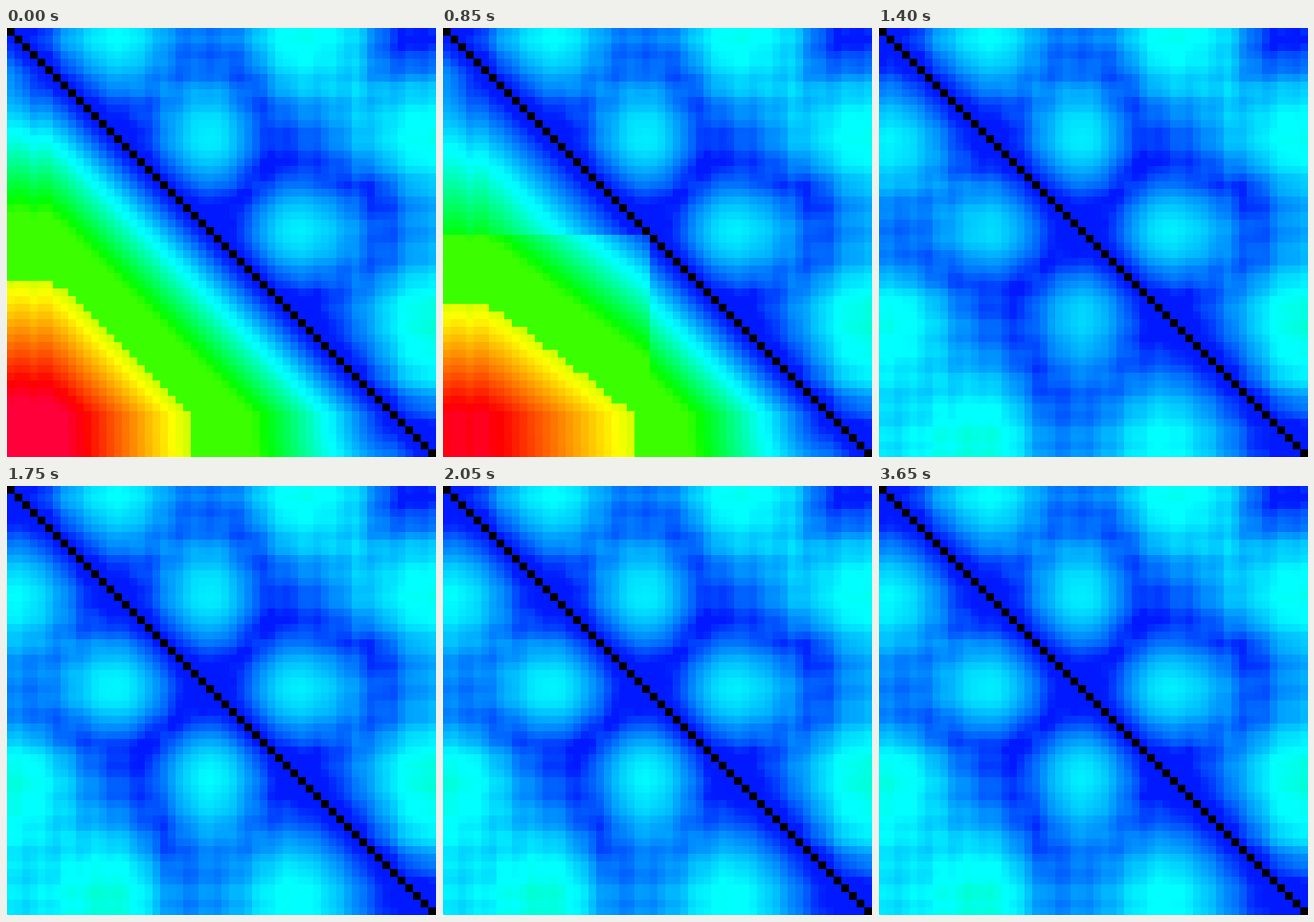
A matplotlib script for the animation above (3750 ms loop, 449x449 px).

```python
import numpy as np
import matplotlib.pyplot as plt
from matplotlib.animation import FuncAnimation
from matplotlib.colors import hsv_to_rgb

SIZE, N, STEP, LOOP = 449, 56, 50, 3750
idx = np.arange(N)

# Four strands: the phase grows by one from turn to turn
phase = np.interp(idx, [1, 14, 26, 37, 53], range(5))


def bundle(first, last):
    """Chain running up and down through four strands, with free ends."""
    keys = [0, .5, 1.5, 2.5, 3.5, 4]
    strands = [(4, 2.5), (0, 0), (2, 0), (-1.8, -1.8)]
    x, y = zip(first, *strands, last)
    a = 2 * np.pi * idx / 3.6
    return np.stack([np.interp(phase, keys, x) + .35 * np.cos(a),
                     np.interp(phase, keys, y) + .35 * np.sin(a),
                     3.9 * np.cos(np.pi * phase)], 1)


def distances(p):
    return np.linalg.norm(p[:, None] - p[None], axis=2)


def hue_of(d):
    """Blue to cyan to green, a green plateau, then yellow to red."""
    near = 234 - 54 * np.clip((d - 1.5) / 7, 0, 1) ** .9
    near = np.maximum(106, near - 7.7 * np.maximum(d - 9, 0))
    far = np.maximum(-14, 60 - 5.3 * (d - 29))
    return np.where(d < 27, near, far) % 360


def ramp(t, start, end):
    return float(np.clip((t - start) / (end - start), 0, 1))


NATIVE = bundle((0, 4), (-1, 5))
FOLDED = bundle((2.5, 4), (-4, 0))

# Straight chain with both ends bent sideways
along = np.clip(idx, 5.5, 50)
ripple = np.where(idx < 7, .35 * np.cos(2 * np.pi * idx / 3), 0)
side = .9 * np.maximum(5.5 - idx, 0) + .8 * np.maximum(idx - 50, 0)
EXTENDED = np.stack([along + ripple, side, 0 * idx], 1)

# The first half draws together before the rest
squeezed = np.where(idx < 27, 7 + .76 * (along - 5.5), along - 1.5)
HALF = np.stack([squeezed + ripple, side, 0 * idx], 1)

rng = np.random.default_rng(4)
SWAY = .5 * np.sin(idx[:, None] / 5 + rng.uniform(0, 2 * np.pi, 3))


def pose(t):
    if t < 400:
        nudge = .12 * np.sin(idx / 4)[:, None] * np.array([0, 1, 0])
        return EXTENDED + nudge * ramp(t, 100, 250)
    if t <= 850:
        return EXTENDED + ramp(t, 400, 850) ** 3 * (HALF - EXTENDED)
    fade = 1 - ramp(t, 1400, 3100)
    swing = np.cos(2 * np.pi * (t - 1400) / 1000)
    end = FOLDED + fade * swing * SWAY
    k = ramp(t, 850, 1400)
    k = k * k * (3 - 2 * k)
    start = HALF - HALF.mean(0) + FOLDED.mean(0)
    return start + k * (end - start)


UPPER = distances(NATIVE)


def picture(t):
    d = np.where(idx[:, None] < idx, UPPER, distances(pose(t)))
    one = np.ones_like(d)
    rgb = hsv_to_rgb(np.stack([hue_of(d) / 360, one, one], 2))
    rgb[idx, idx] = 0
    return rgb


fig = plt.figure(figsize=(SIZE / 100, SIZE / 100), dpi=100, facecolor="white")
ax = fig.add_axes([1 / SIZE, 1 / SIZE, (SIZE - 1) / SIZE, (SIZE - 1) / SIZE])
ax.axis("off")
image = ax.imshow(picture(0), interpolation="nearest", aspect="auto")


def draw(frame):
    image.set_data(picture(frame * STEP))
    return [image]


anim = FuncAnimation(fig, draw, frames=LOOP // STEP, interval=STEP,
                     repeat=True, repeat_delay=0)
plt.show()
```
